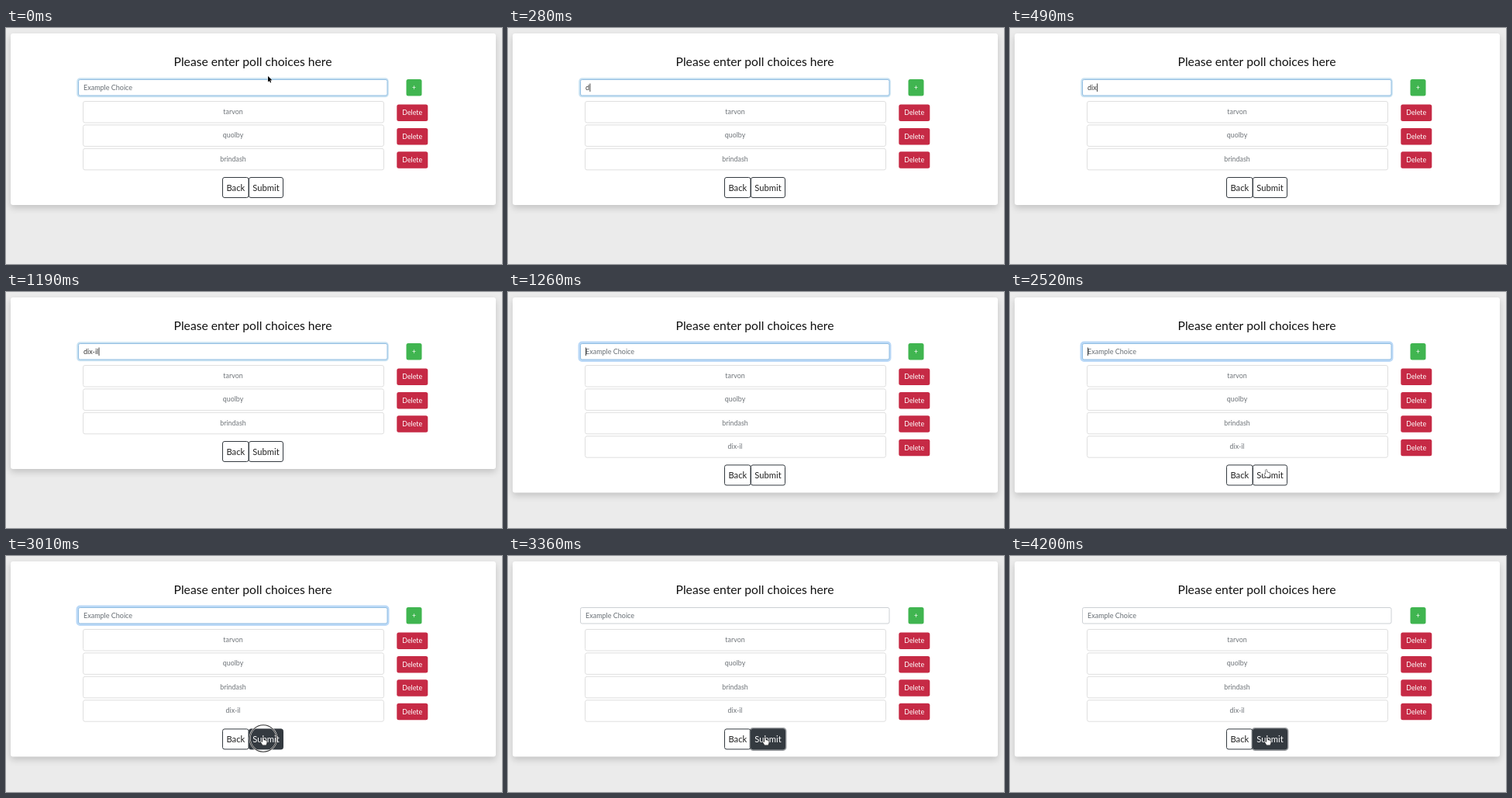
An HTML page with a canvas for the animation above (4270 ms loop, 640 px wide and 304 px high).

```html
<!DOCTYPE html>
<html lang="en">
<head>
<meta charset="utf-8">
<title>Poll choices</title>
<style>
html, body { margin: 0; height: 100%; overflow: hidden; background: #ebebeb; }
canvas { display: block; }
</style>
</head>
<body>
<canvas id="stage" width="640" height="304"></canvas>
<script>
const c = document.getElementById('stage').getContext('2d');
const LOOP = 4270, ADDED = 1260, CLICK = 2870, BLUR = 3010;
const ROW = 30.4;
const choices = ['tarvon', 'quolby', 'brindash', 'dix-il'];
const keyTimes = [210, 320, 430, 700, 850, 980];
// pointer tip: time, x, y
const path = [
  [1470, 338, 62], [1680, 331, 92], [1890, 321, 136], [2030, 322, 144],
  [2240, 327, 196], [2450, 331, 227], [2520, 331, 229], [2730, 332, 234]
];

const ramp = (t, from, to) => Math.max(0, Math.min(1, (t - from) / (to - from)));
const ease = u => u * u * (3 - 2 * u);
const mix = (a, b, u) => a.map((v, i) => v + (b[i] - v) * u);
const rgb = v => `rgb(${v.map(Math.round)})`;

function box(x, y, w, h, r, fill, line, width = 1) {
  c.beginPath();
  c.roundRect(x, y, w, h, r);
  if (fill) { c.fillStyle = fill; c.fill(); }
  if (line) { c.strokeStyle = line; c.lineWidth = width; c.stroke(); }
}

function label(s, x, y, size, color, align = 'center') {
  c.font = `${size}px Lato, "Open Sans", sans-serif`;
  c.textAlign = align;
  c.fillStyle = color;
  c.fillText(s, x, y);
}

function shape(points, x, y) {
  c.beginPath();
  points.forEach(([px, py]) => c.lineTo(x + px, y + py));
  c.closePath();
  c.lineJoin = 'round';
  c.lineWidth = 1;
}

function arrow(x, y) {
  shape([[0, 0], [0, 7.4], [1.8, 5.9], [3, 8.6], [4.2, 8.1], [3, 5.4], [5.4, 5.2]], x, y);
  c.strokeStyle = '#fff';
  c.stroke();
  c.fillStyle = '#000';
  c.fill();
}

function hand(x, y) {
  shape([[-1, 0], [0.4, 0], [0.6, 3], [4.4, 4], [4.6, 6.5], [3.6, 9.5],
    [-0.8, 9.5], [-3.2, 5.8], [-2.2, 5], [-1, 6]], x, y);
  c.strokeStyle = '#222';
  c.stroke();
  c.fillStyle = '#fff';
  c.fill();
}

function pointerAt(t) {
  if (t < keyTimes[0]) return [338, 62];
  if (t < path[0][0]) return null;
  const i = path.findIndex(p => p[0] > t);
  if (i < 0) return path[path.length - 1].slice(1);
  const a = path[i - 1], b = path[i];
  return mix(a.slice(1), b.slice(1), ramp(t, a[0], b[0]));
}

function input(t) {
  const focus = 1 - ease(ramp(t, BLUR, BLUR + 210));
  if (focus > 0) {
    c.globalAlpha = focus;
    box(92.5, 65.5, 400, 22.5, 3, null, t < ADDED ? '#c9e2f2' : '#bbd9f7', t < ADDED ? 2.5 : 4);
    c.globalAlpha = 1;
  }
  box(93.5, 66.5, 398.5, 20.5, 2, '#fff', rgb(mix([204, 208, 212], [146, 190, 226], focus)));

  const typed = t < ADDED ? choices[3].slice(0, keyTimes.filter(k => k <= t).length) : '';
  label(typed || 'Example Choice', 100, 80, 9, typed ? '#333' : '#666d73', 'left');
  const blink = t >= ADDED && t < BLUR && (t - 1280) % 1060 < 530;
  if (typed || blink) {
    c.fillStyle = '#333';
    c.fillRect(100 + (typed ? c.measureText(typed).width + 0.4 : 0), 71.5, 0.9, 10.5);
  }
}

function draw(t) {
  const rows = t < ADDED ? 3 : 4;
  const shift = (rows - 3) * ROW;
  c.fillStyle = '#ebebeb';
  c.fillRect(0, 0, 640, 304);

  c.save();
  c.shadowColor = 'rgba(0,0,0,.17)';
  c.shadowBlur = 8;
  c.shadowOffsetY = 4;
  box(6, 7, 626, 221 + shift, 3, '#fff');
  c.restore();

  label('Please enter poll choices here', 318.5, 48.5, 15.7, '#111');
  input(t);
  box(516.5, 66, 20, 21.5, 2.5, '#40b550');
  label('+', 526.5, 79.5, 8.5, '#fff');

  for (let i = 0; i < rows; i++) {
    const y = i * ROW;
    box(99.5, 94.5 + y, 388, 27.5, 2.5, '#fff', '#dfdfdf');
    label(choices[i], 293, 111 + y, 8.9, '#70757a');
    box(504.3, 98.5 + y, 40, 21.5, 2.5, '#c62a45');
    label('Delete', 524.2, 112.3 + y, 8.9, '#fff');
  }

  const y = 192.5 + shift;
  const hover = ease(ramp(t, 2540, 2730));
  const ring = ease(ramp(t, BLUR, BLUR + 210));
  const dark = [52, 58, 64];
  box(279.5, y, 33.5, 26, 2.5, '#fff', '#343a40');
  label('Back', 296.3, y + 17.3, 11.2, '#222');
  if (ring) box(313, y - 0.5, 45, 27, 3, null, `rgba(52,58,64,${ring * 0.5})`, 3);
  box(313.5, y, 44, 26, 2.5, rgb(mix([255, 255, 255], dark, hover)), '#343a40');
  label('Submit', 335.5, y + 17.3, 11.2, rgb(mix([34, 34, 34], [255, 255, 255], hover)));

  if (t >= CLICK && t < 3220) {
    c.globalAlpha = 1 - ramp(t, 3080, 3220);
    c.beginPath();
    c.arc(332, 235, 17.3, 0, 7);
    c.strokeStyle = '#fff';
    c.lineWidth = 2;
    c.stroke();
    c.strokeStyle = '#333';
    c.lineWidth = 1.1;
    c.stroke();
    c.globalAlpha = 1;
  }

  const tip = pointerAt(t);
  if (tip) (tip[1] > 222 ? hand : arrow)(...tip);
}

const start = performance.now();
function tick() {
  draw((performance.now() - start) % LOOP);
  requestAnimationFrame(tick);
}
tick();
</script>
</body>
</html>
```
